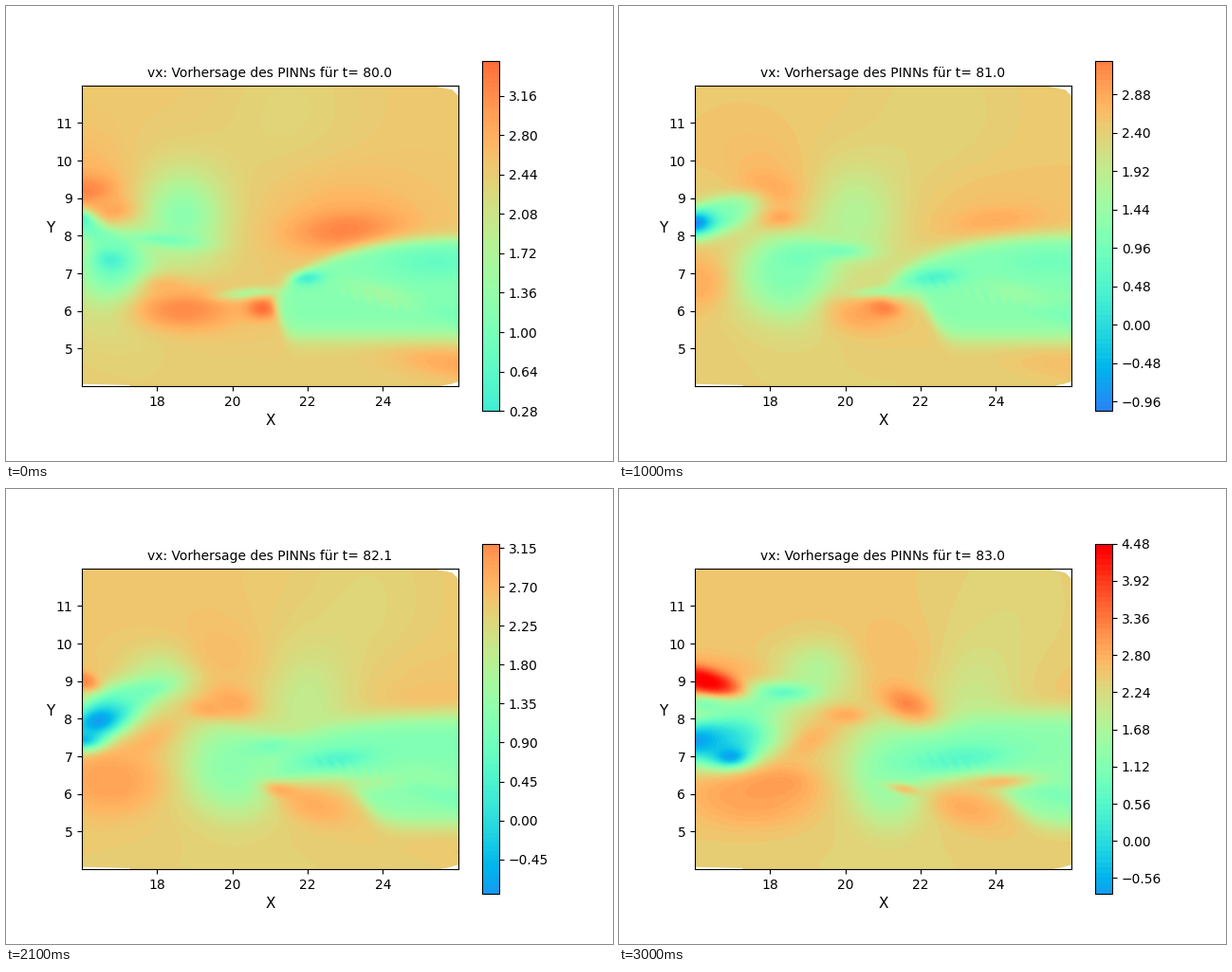
A matplotlib script that plays this animation: 640 px wide and 480 px high, repeating every 3.1 s.

```python
import numpy as np
import matplotlib.pyplot as plt
from matplotlib.animation import FuncAnimation
from matplotlib.path import Path

STEPS = 31
X, Y = np.meshgrid(np.linspace(16, 26, 241), np.linspace(4, 12, 193))

# Convex hull of the sample points: the corners stay white
HULL = Path([(16, 4.06), (17.25, 4.03), (17.3, 4), (25.5, 4), (25.8, 4.06),
             (26, 4.12), (26, 11.72), (25.85, 11.88), (25.4, 11.97), (25.35, 12),
             (16.15, 12), (16.13, 11.97), (16, 11.93), (16, 4.06)])

# Key points of the value range over time
TIMES = [0, 0.4, 1, 1.7, 2.1, 2.6, 3]
LOW = [0.30, -0.57, -1.05, -0.92, -0.82, -0.69, -0.77]
HIGH = [3.46, 3.43, 3.27, 3.12, 3.18, 4.11, 4.43]


def sigmoid(u):
    return 0.5 * (1 + np.tanh(u / 2))


def rise(t, start, end):
    """Smooth step from 0 to 1."""
    u = np.clip((t - start) / (end - start), 0, 1)
    return u * u * (3 - 2 * u)


class Field:
    """Velocity field painted as soft elliptic patches over a uniform flow."""

    def __init__(self, base):
        self.z = np.full_like(X, base)

    def blend(self, weight, value):
        self.z += weight * (value - self.z)

    def blob(self, x, y, sx, sy, value, tilt=0, a=1, p=1):
        c, s = np.cos(np.radians(tilt)), np.sin(np.radians(tilt))
        u = ((X - x) * c + (Y - y) * s) / sx
        v = ((Y - y) * c - (X - x) * s) / sy
        self.blend(a * np.exp(-(u * u + v * v) ** p), value)


def backdrop(f, t):
    f.blob(21.5 + t, 11, 2, 3, 2.34)
    f.blob(21, 4, 7, 1.1, 2.4)
    f.blob(25.9, 4.65, 1.7, 0.45, 2.42 + 0.46 * np.exp(-0.7 * t), -8)


def vortices(f, t):
    x = 18.65 + 1.62 * t
    f.blob(x, 8.6, 1.7, 1.7, 2.12, a=0.85)
    f.blob(x, 8.5, 1.05, 1.05, 2 - 0.85 * np.exp(-0.9 * t))

    x = 16.85 + 1.7 * t - 0.09 * t * t
    f.blob(x, 6.6, 1.7, 1.5, 1.95, a=0.85)
    f.blob(x, 7.2 - 0.2 * t, 1 + 0.25 * np.sin(np.pi * t / 3), 0.95 + 0.15 * t,
           1 + 0.14 * t, p=1.4)
    f.blob(18.2 + 1.8 * t - 0.2 * t * t, 7.9 - 0.3 * t, 1 - 0.12 * t, 0.2 + 0.04 * t,
           0.92, -5 + 4 * t)
    f.blob(16.8 + 2 * t, 7.45, 0.45 + 0.3 * t, 0.4, 0.33 + 0.55 * t,
           a=1 - rise(t, 0.8, 1.6))


def jets(f, t):
    x, fade = 23 + 0.95 * t + 0.08 * t * t, np.exp(-0.8 * t)
    f.blob(x, 8.6, 2.2, 1.3, 2.5 + 0.22 * fade)
    f.blob(x, 8.15 + 0.18 * t, 1.4 - 0.1 * t, 0.5 - 0.08 * t, 2.5 + 0.75 * fade, 4)

    f.blob(18.7 + 1.95 * t - 0.15 * t * t, 6.05 - 0.13 * t, 1 + 0.4 * np.exp(-3 * t),
           0.5 + 0.08 * np.exp(-t), 2.84 + 0.33 * np.exp(-2.5 * t),
           -18 * rise(t, 1, 1.7), p=1.15)
    f.blob(18.2 + 1.7 * t, 6.65 - 0.4 * t, 0.65, 0.32, 2.8, a=0.8 - 0.8 * rise(t, 0.4, 1.3))
    f.blob(20.5 + 0.45 * t, 6.47 + 0.05 * t, 0.85, 0.16, 1.4, 4, 0.85)
    f.blob(20.8 + 0.25 * t, 6.07 + 0.025 * t, 0.45, 0.28 - 0.05 * t, 3.46 - 0.2 * t, -4 * t)


def wake(f, t):
    top = 7.95 + 0.08 * t - (1.2 - 0.2 * t) * np.exp(-(X - 21.5) / 1.4)
    low = 6.5 - (1.22 + 0.05 * t) * sigmoid((X - 21.2 - 1.07 * t) / (0.12 + 0.07 * t))
    weight = (sigmoid((top - Y) / (0.09 + 0.03 * t)) * sigmoid((Y - low) / 0.16)
              * sigmoid((X - 21.1) / 0.15))
    f.blend(weight, 1.18 + 0.04 * t)

    f.blob(25.4, 7.3, 1.5, 0.5, 0.72 + 0.18 * t, a=0.9)
    f.blob(25.6, 6, 0.9, 0.28, 0.95, -15, 0.8)
    f.blob(24 + 0.6 * t, 6.45, 1, 0.25, 1.6 - 0.1 * t, -15, 0.8)
    f.blob(22.8, 7.1, 1.7, 0.55, 0.92, 10, 0.25 * t)
    f.blob(22 + 0.35 * t, 6.87 + 0.02 * t, 0.45 + 0.27 * t, 0.2 + 0.04 * t,
           0.38 + 0.07 * t, 6)
    f.blob(22 + 0.7 * t, 6.2 + 0.04 * t, 0.95, 0.2, 2.7, 4, 0.95 * rise(t, 1.6, 3))

    # fine ripples along the shear line
    line = 6.65 + 0.1 * t - 0.24 * (X - 22.3)
    span = np.exp(-((Y - line) / 0.16) ** 2 - ((X - 23.7 + 0.2 * t) / 1.3) ** 2)
    f.z += 0.12 * span * np.sin(2 * np.pi * (X + 0.5 * Y) / 0.3)


def gust(f, t):
    f.blob(16 + 1.12 * t, 8.8 + 0.18 * t, 1.2, 0.75, 1.5, 8, 0.85 * rise(t, 0.5, 1.8))
    f.blob(16.1 + 1.7 * t, 9.7, 1.35, 1.05, 2.72 - 0.02 * t, -25, 0.9)
    bulge = np.exp(-((t - 1.6) / 0.35) ** 2)
    f.blob(16.15 + 1.83 * t, 9.2 - 0.8 * rise(t, 1.3, 2.2), 0.75, 0.42 + 0.3 * bulge,
           2.84 + 0.17 * (t - 1.5) ** 2, -7 * t)
    f.blob(16.8 + 1.6 * t - 0.18 * t * t, 8.7 - 0.2 * t, 0.6, 0.32 - 0.03 * t, 2.88)


def inflow(f, t, low, high):
    # warm region growing at the lower left
    f.blob(15.7 + 0.2 * t + 0.14 * t * t, 7.1 - 0.35 * t, 0.3 + 0.48 * t,
           0.5 + 0.4 * rise(t, 0.3, 1.5), 2.1 + 0.85 * rise(t, 0.2, 1.3),
           a=rise(t, 0, 0.6), p=1.4)
    f.blob(17.3 + 0.3 * t, 6.3, 0.8, 0.35, 3.05, a=0.8 * rise(t, 2, 3))
    f.blob(14.9 + 1.37 * t, 7.4, 0.85, 0.33, 2.78, 35, rise(t, 1.4, 2.4))

    # hot jet entering on the left, first its halo
    heat = rise(t, 1.9, 2.9)
    f.blob(16.3, 9.25, 1.4, 0.42, 2.95, -5, heat)

    # cold pool with its streak and cores
    tilt = -28 + 60 * t - 16 * t * t
    late = rise(t, 2, 2.7)
    f.blob(17.6, 8.4, 1.3, 0.5, 1.3, 5, 0.9 * late)
    f.blob(16.35 + 0.18 * t, 8.05 + 0.7 * t - 0.3 * t * t, 1 + 0.1 * t, 0.33 + 0.13 * t,
           1 - 0.8 * rise(t, 1.3, 2.8), tilt, p=1.3)
    f.blob(15.8 + 0.85 * t, 8.7, 0.85, 0.26, 1.4 - 0.22 * t, 20 * np.sin(np.pi * t / 3),
           rise(t, 0.4, 1.2))
    f.blob(16 + 0.45 * np.exp(-((t - 2.2) / 0.5) ** 2), 8.45 - 0.115 * t * t,
           0.38 + 0.14 * t, 0.24 + 0.08 * t, low + 0.25 * (1 - rise(t, 0, 0.4)), 0.6 * tilt)
    f.blob(14 + 0.98 * t, 8.5 - 0.5 * t, 0.5, 0.28, low + 0.3 * (3 - t), 0,
           rise(t, 1.6, 2.2))
    f.blob(16.3, 8.38, 0.65, 0.25, 1, a=0.9 * late)

    f.blob(16 + 0.2 * heat, 9.02, 0.35 + 0.7 * heat, 0.22 + 0.1 * heat, high, -14,
           rise(t, 1.8, 2.1), p=1.4)


def velocity(t):
    low, high = np.interp(t, TIMES, LOW), np.interp(t, TIMES, HIGH)
    f = Field(2.51)
    for part in (backdrop, vortices, jets, wake, gust):
        part(f, t)
    inflow(f, t, low, high)
    z = f.z
    return np.interp(z, [z.min(), 0.9, 2.7, z.max()], [low, 0.9, 2.7, high])


fig = plt.figure(figsize=(6.4, 4.8), dpi=100)


def draw(step):
    t = step / 10
    fig.clear()
    ax = fig.add_subplot()
    cs = ax.contourf(X, Y, velocity(t), 80, cmap="rainbow", vmin=-2.2, vmax=4.4)
    fig.colorbar(cs, ax=ax)
    cs.set_clip_path(HULL, ax.transData)
    ax.set_aspect("equal")
    ax.set(xlim=(16, 26), ylim=(4, 12), xticks=range(18, 25, 2), yticks=range(5, 12))
    ax.set_xlabel("X", fontsize=11)
    ax.set_ylabel("Y", fontsize=11, rotation=0)
    ax.set_title(f"vx: Vorhersage des PINNs für t= {80 + t:.1f}", fontsize=10)
    return []


anim = FuncAnimation(fig, draw, frames=STEPS, interval=100, repeat=True,
                     repeat_delay=0, init_func=lambda: draw(0))
plt.show()
```
